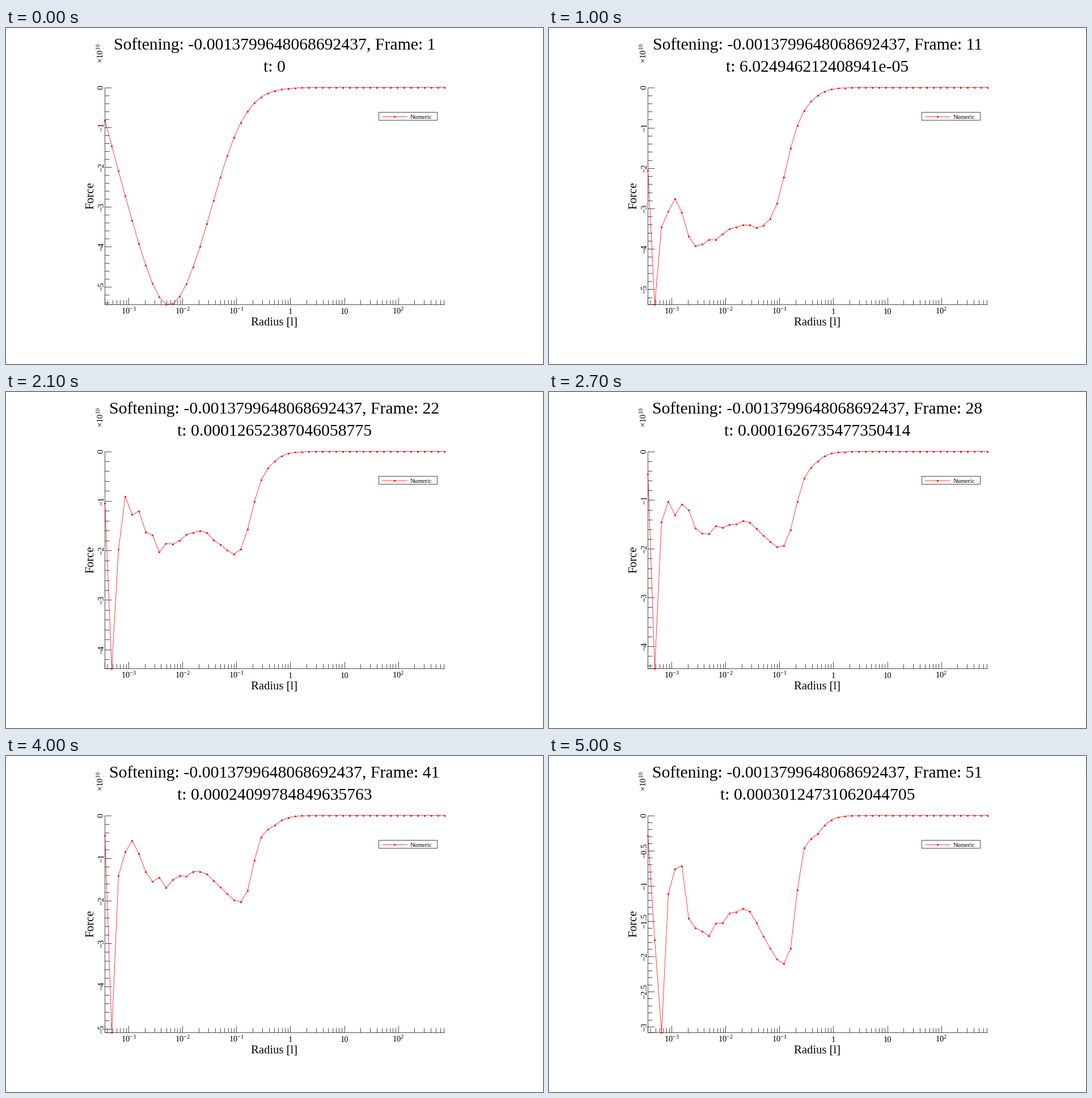
Recreate the animation shown at these times as a matplotlib script. Size 947x592 px, loop 5.1 s.

```python
import numpy as np
import matplotlib.pyplot as plt
from matplotlib.animation import FuncAnimation
from matplotlib.collections import LineCollection
from matplotlib.patches import Rectangle

W, H, DPI = 947, 592, 64
PX = 72 / DPI
FRAMES, INTERVAL = 51, 100
POINTS = 51
TIME_STEP = 6.024946212408941e-06
LEFT, RIGHT, TOP, BOTTOM = 174.5, 773.5, 104.5, 486.5
HEIGHT = BOTTOM - TOP
ONE_X, DECADE = 501.5, 95.1

plt.rcParams.update({
    "font.family": "Liberation Serif",
    "mathtext.fontset": "custom",
    "mathtext.rm": "Liberation Serif",
    "mathtext.default": "rm",
})

index = np.arange(POINTS)
xs = np.linspace(LEFT, RIGHT, POINTS)
RADIUS_RATIO = 1.3364  # between neighbouring points

# Few particles lie near the centre, so noise and ripple fade outwards
noise = np.random.default_rng(4).normal(size=(FRAMES, POINTS)).clip(-2, 2)
JITTER = 0.6 * noise * np.exp(-index / 4)
RIPPLE = (1.2 * np.exp(-index / 5)
          * np.cos(np.pi * (0.95 + np.sqrt(index))))


def sigmoid(x):
    return 1 / (1 + np.exp(-x))


def start_force():
    """Far field 1 / (r + a)^2, softened linearly towards the centre."""
    far = 5.4 / (0.88 + 0.89 * RADIUS_RATIO ** (index - 18.0)) ** 2
    ramp = 0.12 + 0.094 * index
    return far, far * ramp / (1 + ramp ** 8) ** (1 / 8)


FAR, START = start_force()


def shell_force(n):
    """Inner plateau, a growing bump, a steep outer edge and a low ledge."""
    age = n - 6
    plateau = 1.03 + 4.55 * np.exp(-age / 5.6)
    bump = max(0, 0.85 * (1 - np.exp(-age / 20)))
    edge = 21.8 - 3.2 * np.exp(-age / 6)
    steepness = 0.65 + 0.035 * age
    inside = plateau * (1 + bump * np.clip((index - 14.5) / 5, 0, 1))
    ledge = 0.25 * sigmoid(1.3 * (23.8 + 0.035 * n - index))
    ledge *= 1 - np.exp(-n / 12)
    return (inside * sigmoid(steepness * (edge - index))
            + ledge + np.minimum(FAR, 0.1))


def force(n):
    shell = shell_force(max(n, 6))
    collapse = min(n / 6, 1)
    logs = (1 - collapse) * np.log(START) + collapse * np.log(shell)
    spread = 1 - np.exp(-n / 20)
    return np.exp(logs + spread * (RIPPLE + JITTER[n]))


fig = plt.figure(figsize=(W / DPI, H / DPI), dpi=DPI, facecolor="white")
ax = fig.add_axes([0, 0, 1, 1])
ax.set_xlim(0, W)
ax.set_ylim(H, 0)
ax.axis("off")


def text(x, y, s, size, ha="center", rotation=0):
    return ax.text(x, y, s, fontsize=size * PX, ha=ha, va="baseline",
                   rotation=rotation, rotation_mode="anchor", color="black")


def strokes(segments):
    lines = LineCollection(segments, colors="black", linewidths=0.7 * PX)
    return ax.add_collection(lines, autolim=False)


def red_line(x, y):
    return ax.plot(x, y, color="red", lw=0.75 * PX, marker="o",
                   ms=3.2 * PX, mew=0)[0]


def x_ticks():
    segments = []
    for power in range(-4, 3):
        for digit in range(1, 10):
            x = ONE_X + DECADE * (power + np.log10(digit))
            if LEFT <= x <= RIGHT:
                length = 12 if digit == 1 else 8
                segments.append([(x, BOTTOM), (x, BOTTOM - length)])
    return segments


strokes([[(LEFT, TOP), (LEFT, BOTTOM)], [(LEFT, BOTTOM), (RIGHT, BOTTOM)],
         [(LEFT, BOTTOM), (LEFT, BOTTOM - 12)]] + x_ticks())
for power in range(-3, 3):
    label = {0: "1", 1: "10"}.get(power, f"$10^{{{power}}}$")
    text(ONE_X + DECADE * power, 504, label, 14.5)
text(473.5, 523.5, "Radius [l]", 20.8)
text(154, 295.5, "Force", 21, rotation=90)
text(172, 61.5, r"$\times10^{10}$", 14.8, ha="left", rotation=90)

ax.add_patch(Rectangle((657.5, 147.5), 103, 14, fill=False, ec="black",
                       lw=0.7 * PX))
red_line([663, 685, 707], [155.5] * 3).set_markevery([1])
text(712.5, 160, "Numeric", 11.1, ha="left")

title = text(473.5, 38, "", 29.75)
clock = text(473.5, 77, "", 29.75)
y_ticks = strokes([])
y_labels = [text(172, TOP, "", 14.5, rotation=90) for _ in range(9)]
curve = red_line(xs, np.full(POINTS, TOP))


def draw_y_axis(low):
    step = next(s for s in (0.1, 0.2, 0.5, 1, 2, 5, 10) if low / s <= 8)
    parts = 4 if step in (0.2, 2) else 5
    scale = HEIGHT / low
    segments = [[(LEFT, BOTTOM), (LEFT + 12, BOTTOM)]]
    for k in range(int(low / step * parts + 1e-9) + 1):
        y = TOP + k * step / parts * scale
        length = 8 if k % parts else 12
        segments.append([(LEFT, y), (LEFT + length, y)])
    y_ticks.set_segments(segments)
    for k, label in enumerate(y_labels):
        value = k * step
        label.set_visible(value <= low)
        label.set_y(TOP + value * scale)
        label.set_text(f"\u2212{value:g}" if k else "0")


def update(n):
    depth = force(n)
    low = depth.max()
    curve.set_ydata(TOP + depth * HEIGHT / low)
    draw_y_axis(low)
    title.set_text(f"Softening: -0.0013799648068692437, Frame: {n + 1}")
    clock.set_text(f"t: {n * TIME_STEP if n else 0}")
    return [curve, y_ticks, title, clock, *y_labels]


anim = FuncAnimation(fig, update, frames=FRAMES, interval=INTERVAL,
                     init_func=lambda: update(0), repeat=True, repeat_delay=0)
plt.show()
```
